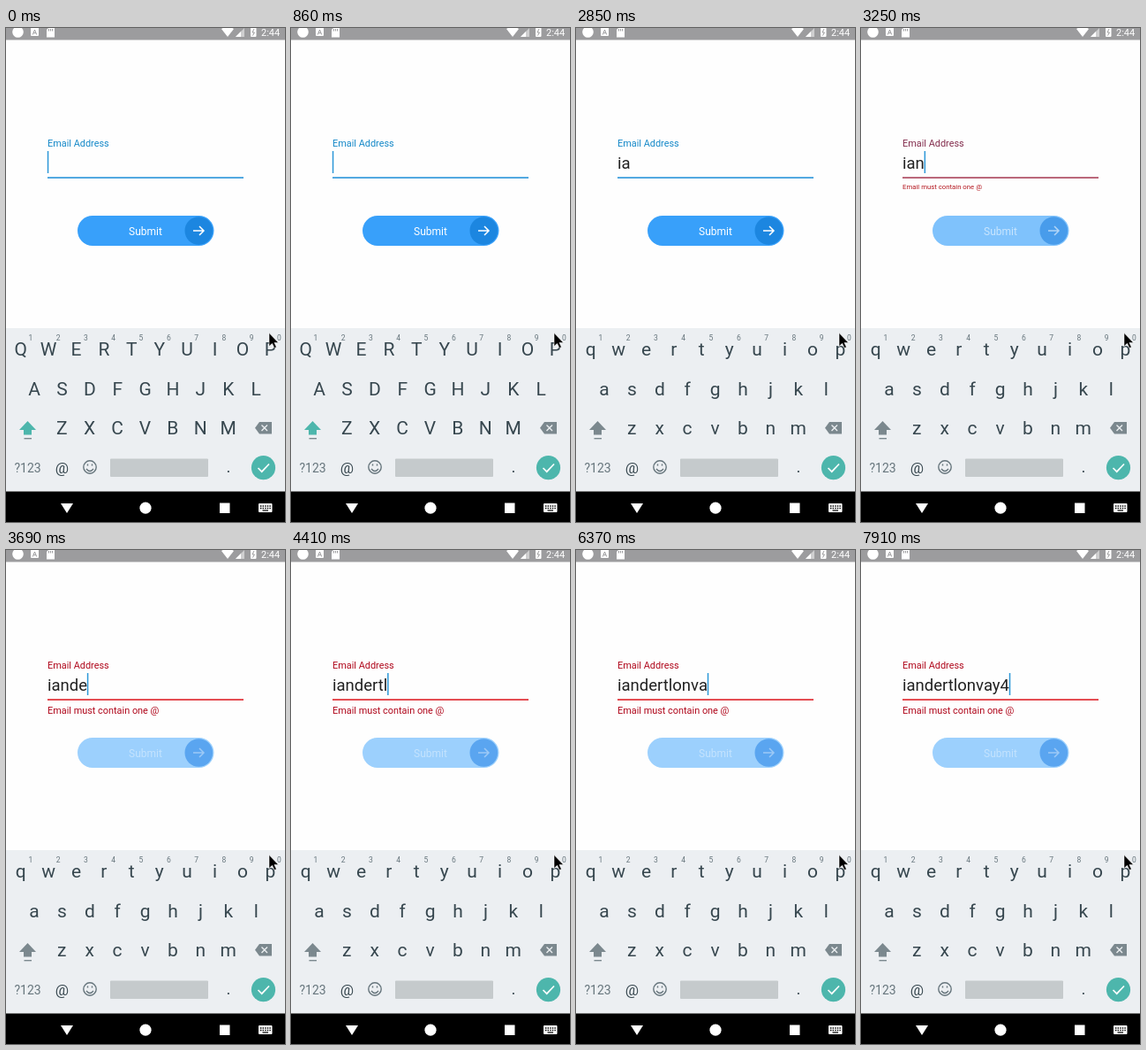
An HTML page that plays this animation: 316 px wide and 558 px high, repeating every 8000 ms.

```html
<!DOCTYPE html>
<html lang="en">
<head>
<meta charset="utf-8">
<title>Email form</title>
<style>
  html, body { margin: 0; width: 100%; height: 100%; overflow: hidden; background: #fefefe; }
  svg { display: block; width: 316px; height: 558px; font-family: Roboto, sans-serif; }
  .key { font-size: 21px; text-anchor: middle; fill: #37474f; }
  .hint { font-size: 8.5px; text-anchor: middle; fill: #66757c; }
</style>
</head>
<body>
<svg viewBox="0 0 316 558">
  <rect width="316" height="558" fill="#fefefe"/>

  <g id="status" fill="#fff">
    <rect width="316" height="13.5" fill="#9c9c9e"/>
    <circle cx="13.5" cy="4.5" r="6.3"/>
    <rect x="28" y="-1" width="9" height="10" rx="1"/>
    <path d="M30.3 7.5L32.5 2L34.7 7.5M31.2 5.7H33.8" fill="none" stroke="#9c9c9e"/>
    <path d="M49 -1H55V10.5H46V2Z"/>
    <path d="M48.5 1V3.5M50.5 1V3.5M52.5 1V3.5" stroke="#9c9c9e"/>
    <path d="M244 1Q251 -4 258 1L251 10Z"/>
    <path d="M260 10L270 0V10Z" fill-opacity=".5"/>
    <path d="M260 10L266 4V10Z"/>
    <rect x="277" y="-1" width="6.5" height="11" rx="1"/>
    <path d="M281 1L279 5H281.5L279.5 8.5" fill="none" stroke="#9c9c9e"/>
    <text x="289" y="9" font-size="11">2:44</text>
  </g>

  <text id="label" x="47" y="134" font-size="10.9">Email Address</text>
  <text id="entry" x="47" y="159" font-size="18.5" fill="#212121"></text>
  <rect id="caret" y="139" width="1.5" height="25" fill="#2d98d8"/>
  <rect id="line" x="47" y="168.3" width="222" height="1.6"/>
  <text id="error" x="47">Email must contain one @</text>

  <rect id="button" x="81" y="212" width="154.5" height="34" rx="17"/>
  <circle id="disc" cx="218.3" cy="229" r="15.8"/>
  <g id="caption">
    <text x="158" y="234" font-size="12" text-anchor="middle" fill="#fff">Submit</text>
    <path d="M212 229H224M219 224L224 229L219 234" fill="none" stroke="#fff" stroke-width="1.5"/>
  </g>

  <rect y="339" width="316" height="184.5" fill="#eceff2"/>
  <g id="keys"></g>
  <g id="shift">
    <path d="M24.5 444L34 454H29V459.5H20V454H15Z"/>
    <rect x="20.5" y="463" width="8.5" height="1.4" fill="#7b888e"/>
  </g>
  <path d="M287 445H301V458.5H287L282 451.7Z" fill="#7b888e"/>
  <path d="M289.5 448.5L296 455M296 448.5L289.5 455" stroke="#eceff2" stroke-width="1.4"/>
  <text x="9.5" y="501.5" font-size="14" fill="#66757c">?123</text>
  <text x="63.5" y="502.5" font-size="17" text-anchor="middle" fill="#37474f">@</text>
  <g fill="none" stroke="#66757c" stroke-width="1.4">
    <circle cx="95" cy="496" r="7.2"/>
    <path d="M91 498Q95 503 99 498"/>
    <path d="M92.5 492.5V494.5M97.5 492.5V494.5"/>
  </g>
  <rect x="118" y="486.5" width="111" height="20.5" rx="1" fill="#c5cacc"/>
  <text x="252" y="502" font-size="19" text-anchor="middle" fill="#37474f">.</text>
  <circle cx="291.5" cy="496.7" r="13.6" fill="#4db6ac"/>
  <path d="M285.5 497L289.7 501.2L298 492.5" fill="none" stroke="#fff" stroke-width="1.7"/>

  <rect y="523.5" width="316" height="34.5"/>
  <g fill="#fff">
    <path d="M62 537H76L69 548Z"/>
    <circle cx="158" cy="542.2" r="6.6"/>
    <rect x="242" y="536.5" width="11.5" height="11.5"/>
    <rect x="286" y="537" width="15.5" height="10" rx="1"/>
  </g>
  <path d="M288 540H300M288 542.5H300" stroke="#000" stroke-width="1.3" stroke-dasharray="1.4 1.2"/>
  <path d="M290.5 545H297" stroke="#000" stroke-width="1.2"/>

  <path d="M298 344.5V359.5L301.5 356.3L304 361.5L306.3 360.4L303.9 355.5H308.5Z" fill="#000" stroke="#fff" stroke-width=".5"/>
</svg>
<script>
const LOOP = 8000;
const ENTRY = "iandertlonvay4";
const KEY_TIMES = [1550, 2350, 2900, 3420, 3650, 3850, 4080, 4320, 4900, 5300, 5750, 6150, 6600, 7440];
const BLINK = 500, FIRST_BLINK = -250;
const INVALID_AT = 2940, FADE = 500;
const PITCH = 31.4;
const ROWS = [["qwertyuiop", 16.7, 370], ["asdfghjkl", 32, 415], ["zxcvbnm", 63.3, 459.3]];

const $ = id => document.getElementById(id);
const letters = [];

function addText(cls, x, y, value) {
  const node = document.createElementNS("http://www.w3.org/2000/svg", "text");
  node.setAttribute("class", cls);
  node.setAttribute("x", x);
  node.setAttribute("y", y);
  node.textContent = value;
  $("keys").append(node);
  return node;
}

for (const [row, x, y] of ROWS)
  [...row].forEach((char, i) => letters.push({ char, node: addText("key", x + i * PITCH, y, char) }));
for (let i = 0; i < 10; i++) addText("hint", 27.8 + i * 31.3, 353, (i + 1) % 10);

const mix = (from, to, p) => `rgb(${from.map((v, i) => Math.round(v + (to[i] - v) * p))})`;
const easeInOut = p => p < .5 ? 2 * p * p : 1 - 2 * (1 - p) ** 2;

function tint(id, from, to, p) {
  $(id).setAttribute("fill", mix(from, to, p));
}

let shown = -1;
function showEntry(count) {
  if (count === shown) return;
  shown = count;
  $("entry").textContent = ENTRY.slice(0, count);
  $("caret").setAttribute("x", 46.8 + (count ? $("entry").getComputedTextLength() : 0));
  for (const { char, node } of letters) node.textContent = count ? char : char.toUpperCase();
  $("shift").setAttribute("fill", count ? "#7b888e" : "#4db6ac");
}

function render(t) {
  const count = KEY_TIMES.filter(at => at <= t).length;
  showEntry(count);
  const since = t - (count ? KEY_TIMES[count - 1] : FIRST_BLINK);
  $("caret").setAttribute("opacity", Math.floor(since / BLINK) % 2 ? 0 : 1);

  const p = easeInOut(Math.min(1, Math.max(0, (t - INVALID_AT) / FADE)));
  tint("label", [20, 136, 200], [176, 8, 28], p);
  tint("line", [40, 148, 218], [222, 34, 40], p);
  tint("error", [190, 60, 40], [176, 8, 28], p);
  tint("button", [56, 160, 250], [156, 208, 253], p);
  tint("disc", [28, 134, 224], [90, 165, 240], p);
  $("caption").setAttribute("opacity", 1 - .6 * p);
  $("error").setAttribute("font-size", 10.9 * p);
  $("error").setAttribute("y", 174.5 + 10.8 * p);
  $("error").setAttribute("visibility", p > 0 ? "visible" : "hidden");
}

const start = performance.now();
function tick() {
  render((performance.now() - start) % LOOP);
  requestAnimationFrame(tick);
}
tick();
</script>
</body>
</html>
```
